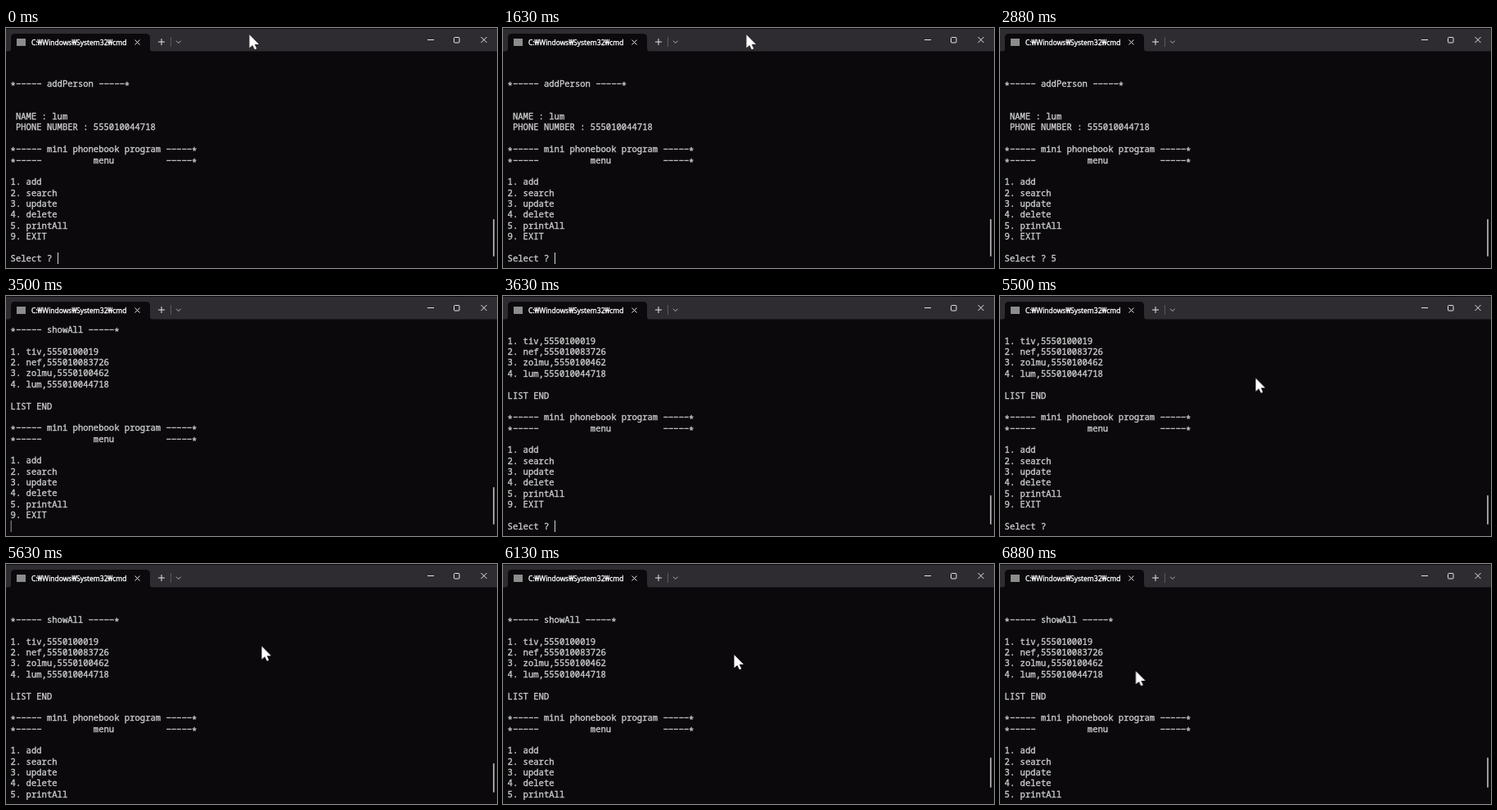
An HTML page for the animation above (8.62 s loop, 600 by 294 pixels).

```html
<!DOCTYPE html>
<html lang="en">
<head>
<meta charset="utf-8">
<title>Phonebook terminal</title>
<style>
  :root { --row: 13.36px; --loop: 8620ms step-end infinite; --back: #0b090c; }
  html, body { margin: 0; width: 100%; height: 100%; overflow: hidden; background: var(--back); }
  .stage { position: relative; width: 600px; height: 294px; overflow: hidden; background: var(--back); }
  .chrome { position: absolute; left: 0; top: 0; }
  .chrome text {
    font: 8.5px "Open Sans", "Noto Sans", sans-serif;
    fill: #fff; stroke: #fff; stroke-width: .35px;
  }

  .terminal {
    position: absolute; left: 0; top: 35.3px; width: 590px;
    height: calc(19 * var(--row)); overflow: hidden;
  }
  pre {
    position: absolute; left: 5.6px; top: 0; margin: 0; color: #ccc;
    font: 10.55px/13.36px "Noto Sans Mono", "DejaVu Sans Mono", monospace;
    font-variant-ligatures: none;
    -webkit-text-stroke: .35px #ccc;
  }
  pre i { font-style: normal; position: relative; top: 2.2px; line-height: 0; }

  .first { animation: first var(--loop); }
  .second { animation: second var(--loop); }
  .typed { animation: typed var(--loop); }
  .caret {
    position: absolute; left: 62.5px; top: 275.2px; width: 1.3px; height: 13.6px;
    background: #d8d8d8; animation: caret var(--loop);
  }
  .thumb {
    position: absolute; left: 595px; top: 234px; width: 1.6px; height: 46px;
    border-radius: 1px; background: #9d9d98; animation: thumb var(--loop);
  }
  .mouse {
    position: absolute; left: 0; top: -.7px; width: 13px; height: 19px;
    animation: mouse var(--loop);
  }

  @keyframes first {
    0% { visibility: visible; }
    40.6%, 100% { visibility: hidden; }
  }
  @keyframes second {
    0% { visibility: hidden; }
    40.6% { visibility: visible; transform: translateY(calc(-2 * var(--row))); }
    42.11% { visibility: visible; transform: translateY(calc(-3 * var(--row))); }
    65.31%, 100% { visibility: visible; transform: none; }
  }
  @keyframes typed {
    0% { opacity: 0; }
    27.6%, 100% { opacity: 1; }
  }
  @keyframes caret {
    0%, 7.3%, 18.9% { opacity: 1; transform: none; }
    1.5%, 14.5%, 26.1% { opacity: 0; transform: none; }
    27.6% { opacity: 1; transform: translateX(6.33px); }
    33.41% { opacity: 0; transform: translateX(6.33px); }
    40.6% { opacity: .7; transform: translateX(-57.3px); }
    42.11%, 55.1% { opacity: 1; transform: none; }
    49.3%, 60.9%, 100% { opacity: 0; transform: none; }
  }
  @keyframes thumb {
    0% { top: 234px; height: 46px; }
    42.11% { top: 243.5px; height: 36.5px; }
    66.7% { top: 240px; height: 36.5px; }
    68.21%, 100% { top: 237px; height: 36.5px; }
  }
  @keyframes mouse {
    0% { visibility: visible; transform: translate(297px, 9px); }
    27.6% { visibility: hidden; transform: translate(297px, 9px); }
    58% { visibility: visible; transform: translate(297px, 9px); }
    60.9% { transform: translate(300px, 38px); }
    62.41% { transform: translate(308px, 82px); }
    63.8%, 65.31%, 66.7% { transform: translate(312px, 101.5px); }
    68.21% { transform: translate(312px, 104px); }
    69.6% { transform: translate(311px, 107px); }
    71.11% { transform: translate(282px, 112px); }
    72.5% { transform: translate(226px, 122px); }
    74.01% { transform: translate(181px, 130px); }
    75.4% { transform: translate(167px, 132px); }
    79.81%, 100% { transform: translate(165.5px, 132px); }
  }
</style>
</head>
<body>
<div class="stage">
  <svg class="chrome" width="600" height="29" viewBox="0 0 600 29">
    <path fill="#2e2c30" d="M0 1H600V28.500H0z"/>
    <path fill="#0b090c" d="M2 29Q6 29 6 25V12Q6 7 11 7H171Q176 7 176 12V25Q176 29 180 29z"/>
    <rect x="13" y="13" width="11" height="9" fill="#8c8c8c"/>
    <text x="31" y="21">C:₩Windows₩System32₩cmd</text>
    <g fill="none" stroke="#e4e4e4">
      <path d="M157.500 14.500l6 6m0-6l-6 6"/>
      <path d="M186 17h8m-4-4v8"/>
      <path stroke="#5a585c" d="M201.500 11v12"/>
      <path stroke="#b4b4b4" d="M208 15.700l2.800 2.800L213.600 15.700"/>
      <path d="M515 14.500h8"/>
      <rect x="547.500" y="11.500" width="6.500" height="6.500" rx="1"/>
      <path d="M580.500 11l7 7m0-7l-7 7"/>
    </g>
  </svg>

  <div class="terminal">
<pre class="first">

<!-- -->
<i>*</i>−−−−− addPerson −−−−−<i>*</i>


 NAME : lum
 PHONE NUMBER : 555010044718

<i>*</i>−−−−− mini phonebook program −−−−−<i>*</i>
<i>*</i>−−−−−          menu          −−−−−<i>*</i>

1. add
2. search
3. update
4. delete
5. printAll
9. EXIT

Select ? <span class="typed">5</span></pre>
<pre class="second">

<!-- -->
<i>*</i>−−−−− showAll −−−−−<i>*</i>

1. tiv,5550100019
2. nef,555010083726
3. zolmu,5550100462
4. lum,555010044718

LIST END

<i>*</i>−−−−− mini phonebook program −−−−−<i>*</i>
<i>*</i>−−−−−          menu          −−−−−<i>*</i>

1. add
2. search
3. update
4. delete
5. printAll
9. EXIT

Select ? </pre>
  </div>
  <div class="caret"></div>
  <div class="thumb"></div>
  <svg class="mouse" viewBox="0 0 13 19">
    <path fill="#fff" d="M.5 .3V16.300L4.300 12.900L6.900 18.300L9.300 17.300L6.800 11.900H12z"/>
  </svg>
</div>
</body>
</html>
```
